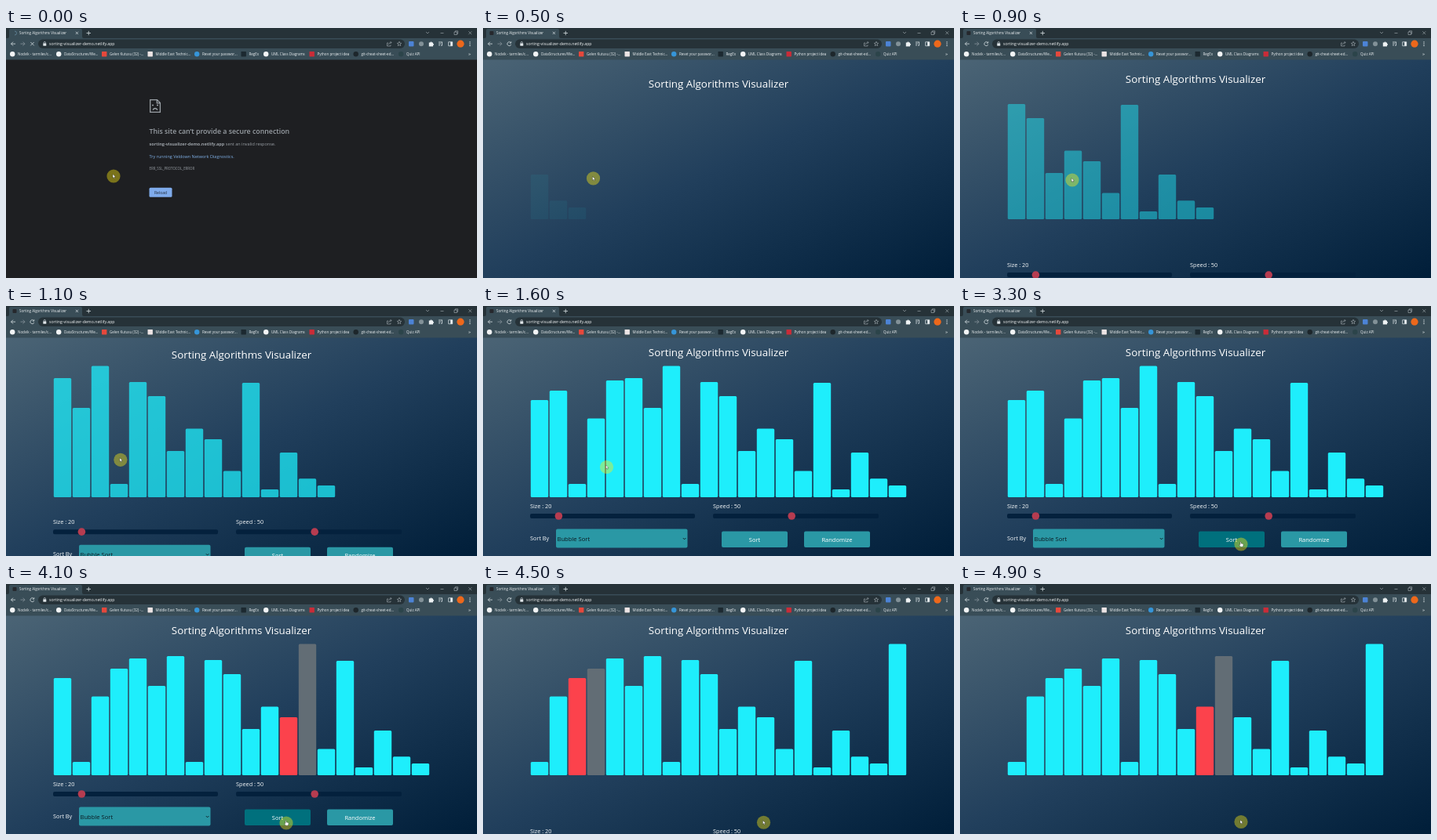
Write an HTML page that moves like this. It is 600 by 319 pixels and loops after 5 s.

```html
<!DOCTYPE html>
<html lang="en">
<head>
<meta charset="utf-8">
<title>Sorting Algorithms Visualizer</title>
<style>
  html, body { margin: 0; width: 100%; height: 100%; overflow: hidden; background: #263238; }
  svg { display: block; width: 100vw; height: 100vh; font-family: "Open Sans", "Noto Sans", sans-serif; }
  .line { fill: none; stroke: #d5dde1; stroke-width: .8; }
  .thin { fill: none; stroke: #b4bec3; stroke-width: .55; }
  .small { font-size: 4.5px; fill: #eef2f4; }
  .label { font-size: 7.3px; font-weight: 500; fill: #f6f9fa; }
  .button { font-size: 7.5px; font-weight: 500; fill: #fff; text-anchor: middle; }
</style>
</head>
<body>
<svg viewBox="0 0 600 319" preserveAspectRatio="none">
  <defs>
    <linearGradient id="night" x1="0" y1="0" x2="1" y2="1">
      <stop offset="0" stop-color="#4b6475"/>
      <stop offset=".5" stop-color="#213f5c"/>
      <stop offset="1" stop-color="#001e39"/>
    </linearGradient>
  </defs>

  <g id="errorPage">
    <rect y="40" width="600" height="279" fill="#1e1f22"/>
    <g fill="none" stroke="#9aa0a6" stroke-width="1.3">
      <path d="M183.7 91.6H192.5L196.4 95.5V107.4H183.7ZM192.3 91.6V95.8H196.4"/>
      <path d="M186 98.5H188M192 98.5H194M187 104.5Q190 100.5 193 104.5"/>
    </g>
    <g fill="#9aa0a6">
      <text x="182.5" y="135" font-size="8.8" font-weight="600">This site can’t provide a secure connection</text>
      <text x="182.5" y="150.3" font-size="5.5"><tspan font-weight="700">sorting-visualizer-demo.netlify.app</tspan> sent an invalid response.</text>
      <text x="182.5" y="165.5" font-size="5.5" fill="#7fb0e6">Try running Veldown Network Diagnostics.</text>
      <text x="182.5" y="181" font-size="4.4">ERR_SSL_PROTOCOL_ERROR</text>
    </g>
    <rect x="182.5" y="203.8" width="29" height="12" rx="1.5" fill="#7fabec"/>
    <text x="197" y="211.6" font-size="5" text-anchor="middle" fill="#202a3a">Reload</text>
  </g>

  <g id="appPage">
    <rect y="40" width="600" height="279" fill="url(#night)"/>
    <text id="title" x="300" y="64.3" font-size="13.35" font-weight="500" text-anchor="middle" fill="#fff">Sorting Algorithms Visualizer</text>
    <g id="bars"></g>
    <g id="controls">
      <text class="label" x="60" y="257.8">Size : 20</text>
      <text class="label" x="293" y="257.8">Speed : 50</text>
      <g fill="#04213d">
        <rect x="60" y="265" width="210" height="6" rx="2"/>
        <rect x="293" y="265" width="211" height="6" rx="2"/>
      </g>
      <g fill="#b63c50">
        <circle cx="96.4" cy="268" r="4.8"/>
        <circle cx="393.2" cy="268" r="4.8"/>
      </g>
      <text class="label" x="60" y="299.3">Sort By</text>
      <rect id="select" x="93" y="284.5" width="167.5" height="24" rx="2" stroke-width=".7"/>
      <text x="94.5" y="299.5" font-size="7.6" fill="#0b1820">Bubble Sort</text>
      <path d="M254.8 296L256.6 297.8L258.4 296" fill="none" stroke="#0b1820" stroke-width=".9"/>
      <rect id="sort" x="304" y="287.5" width="84" height="20.5" rx="2"/>
      <rect x="409" y="287.5" width="84" height="20.5" rx="2" fill="#2a98a5"/>
      <text class="button" x="346" y="300.6">Sort</text>
      <text class="button" x="451" y="300.6">Randomize</text>
    </g>
  </g>

  <g id="browser">
    <rect width="600" height="13" fill="#263238"/>
    <path d="M0 40.5V13H2Q4 13 4 11V3Q4 1 6 1H95Q97 1 97 3V11Q97 13 99 13H600V40.5Z" fill="#394d57"/>
    <text class="small" x="17" y="8.2">Sorting Algorithms Visualizer</text>
    <rect id="favicon" x="8.5" y="4" width="5" height="5" rx="1" fill="#26282d"/>
    <path id="spinner" class="line" d="M11 4A2.5 2.5 0 0 1 11 9" style="stroke:#65889c"/>
    <path class="line" d="M88.8 4.8L92 8M92 4.8L88.8 8M102.5 6.5H108M105.25 3.8V9.2"/>
    <path class="thin" d="M535 5L537 7L539 5M553.5 6.5H557.5M589.3 4.3L593.2 8.2M593.2 4.3L589.3 8.2M571 5H574.5V8.5H571ZM572.3 5V3.8H575.7V7.3H574.5"/>
    <rect x="41" y="14.5" width="467" height="11.5" rx="5.7" fill="#263238"/>
    <path class="line" d="M12 20.2H6.5M9 17.7L6.5 20.2L9 22.7"/>
    <path class="line" d="M18.5 20.2H24M21.5 17.7L24 20.2L21.5 22.7" style="stroke:#87949b"/>
    <path id="stop" class="line" d="M31.3 18L35.7 22.4M35.7 18L31.3 22.4"/>
    <path id="reload" class="line" d="M35.2 18.5A2.5 2.5 0 1 0 35.8 21M35.8 17.3V19.2H33.9"/>
    <rect x="47.3" y="19.5" width="4" height="3.3" rx=".5" fill="#dfe5e8"/>
    <path class="line" d="M48.2 20V18.6A1.1 1.1 0 0 1 50.4 18.6V20" style="stroke-width:.7"/>
    <text x="55" y="22.1" font-size="5.2" fill="#f6f8f9">sorting-visualizer-demo.netlify.app</text>
    <path class="thin" d="M487 19H485.5V23H490V21.5M487 21.5Q487.5 18.5 491 18.5M489.5 17L491 18.5L489.5 20M501 17.3L501.8 19.2L503.7 19.4L502.2 20.7L502.7 22.7L501 21.6L499.3 22.7L499.8 20.7L498.3 19.4L500.2 19.2Z"/>
    <rect x="513" y="17" width="6.5" height="6.5" rx="1" fill="#4c83d6"/>
    <circle cx="529" cy="20.2" r="3" fill="#829198"/>
    <path d="M538.8 18.5H540.5A1 1 0 0 1 542.5 18.5H544V20A1 1 0 0 1 544 22V23.5H538.8Z" fill="#eef2f4"/>
    <path class="line" d="M551 18H556M551 20H554M551 22H553M555.5 18V22.3H554"/>
    <path class="line" d="M563.7 17.8H568.7V22.8H563.7Z"/>
    <rect x="566.2" y="17.8" width="2.5" height="5" fill="#eef2f4"/>
    <circle cx="579" cy="20.2" r="4.6" fill="#ed681b"/>
    <g fill="#eef2f4"><circle cx="591" cy="17.9" r=".65"/><circle cx="591" cy="20.2" r=".65"/><circle cx="591" cy="22.5" r=".65"/></g>
    <text class="small" x="589" y="34.6" style="font-size:6px">»</text>
  </g>

  <g id="cursor">
    <circle r="8.6" fill="#ffeb10" fill-opacity=".41"/>
    <path id="arrow" d="M-1 -2.5V2.3L.1 1.3L.9 3L1.7 2.6L1 1H2.5Z" fill="#fff" stroke="#222" stroke-width=".35"/>
    <path id="hand" d="M-1 -3Q-.4 -3.6 .1 -3V-1L2.7 -.5Q3.2 0 2.8 2L2.2 3.2H-.7L-2.5 .5Q-2.3 -.2 -1 .5Z" fill="#fff" stroke="#222" stroke-width=".35"/>
  </g>
</svg>
<script>
const LOOP = 5000, FRAME = 100, LOADED = 350, SORTING = 3512, STEP = 47;
const HEIGHTS = [124, 136, 17, 100.5, 149, 152, 114, 167.5, 17, 147, 129, 59, 87.5, 74, 33.5, 146, 10, 57, 23.7, 15];
const PATH = [[0, 137, 189], [900, 143, 194], [1600, 157.5, 205.5], [2600, 144.5, 295],
              [3300, 358, 304], [4100, 357, 305], [4900, 358, 303.5], [5000, 358, 303.5]];
const BOOKMARKS = [
  [5, "Nodvik - tarmiles/c...", "#f2f4f5", 1], [64, "DataStructures/We...", "#f2f4f5", 1],
  [122, "Gelen Kutusu (32) -...", "#e5483c"], [180.5, "Middle East Technic...", "#ece4e4"],
  [240, "Reset your passwor...", "#3695d8", 1], [299.5, "RegEx", "#1c2930"],
  [328, "UML Class Diagrams", "#f2f4f5", 1], [386.5, "Python project idea", "#c92c38"],
  [442.5, "git-cheat-sheet-ed...", "#1d262b", 1], [500, "Quiz API", "#2c444a", 1]];

const $ = id => document.getElementById(id);
const clamp = v => Math.max(0, Math.min(1, v));
const show = (id, on) => $(id).setAttribute("visibility", on ? "visible" : "hidden");
const move = (id, x, y) => $(id).setAttribute("transform", `translate(${x} ${y})`);

function add(parent, tag, attrs, text = "") {
  const el = document.createElementNS("http://www.w3.org/2000/svg", tag);
  for (const key in attrs) el.setAttribute(key, attrs[key]);
  el.textContent = text;
  return parent.appendChild(el);
}

for (const [x, name, fill, round] of BOOKMARKS) {
  add($("browser"), "rect", { x, y: 30, width: 6.4, height: 6.4, rx: round ? 3.2 : 0.6, fill });
  add($("browser"), "text", { x: x + 10, y: 34.7, class: "small" }, name);
}
const bars = HEIGHTS.map((_, i) =>
  add($("bars"), "rect", { x: 60.8 + 24 * i, width: 22.4, rx: 1.6 }));

// Bubble sort after the given number of comparisons.
function sortState(steps) {
  const list = [...HEIGHTS];
  let j = -1, end = list.length - 1;
  for (let n = 0; n <= steps; n++) {
    if (++j >= end) { j = 0; end--; }
    if (list[j] > list[j + 1]) [list[j], list[j + 1]] = [list[j + 1], list[j]];
  }
  return { list, j };
}

function cursorAt(t) {
  const i = PATH.findIndex(p => p[0] > t);
  const [t0, x0, y0] = PATH[i - 1], [t1, x1, y1] = PATH[i];
  const p = (t - t0) / (t1 - t0), e = p * p * (3 - 2 * p);
  return [x0 + (x1 - x0) * e, y0 + (y1 - y0) * e];
}

function drawBars(t) {
  const count = Math.max(0, Math.min(20, Math.floor((t - 325) / 50)));
  const { list, j } = t < SORTING ? { list: HEIGHTS.slice(20 - count), j: -9 }
                                  : sortState(Math.floor((t - SORTING) / STEP));
  bars.forEach((bar, i) => {
    const h = list[i] || 0;
    bar.setAttribute("y", 244 - h);
    bar.setAttribute("height", h);
    bar.setAttribute("fill", i === j ? "#fc424c" : i === j + 1 ? "#626d75" : "#1eeefc");
  });
}

function draw(now) {
  const t = Math.floor(now % LOOP / FRAME) * FRAME;
  const loaded = t >= LOADED, entry = clamp((t - LOADED) / 900);
  show("errorPage", !loaded);
  show("appPage", loaded);
  for (const id of ["spinner", "stop"]) show(id, !loaded);
  for (const id of ["favicon", "reload"]) show(id, loaded);
  $("spinner").setAttribute("transform", `rotate(${t * 0.45} 11 6.5)`);

  drawBars(t);
  $("bars").setAttribute("opacity", entry ** 1.6);
  const drop = 121 * (1 - entry + clamp((t - 4250) / 500));
  move("controls", 0, drop);
  move("title", 0, 14 * (1 - entry));

  const [x, y] = cursorAt(t);
  const over = (left, right, top) => x > left && x < right && y > top + drop && y < 308 + drop;
  const onSelect = over(93, 260, 284.5), onSort = over(304, 388, 287.5);
  $("select").setAttribute("fill", onSelect ? "#06808d" : "#2a98a5");
  $("select").setAttribute("stroke", onSelect ? "#7d8d91" : "none");
  $("sort").setAttribute("fill", onSort ? "#00707d" : "#2a98a5");
  move("cursor", x, y);
  show("hand", onSelect || onSort);
  show("arrow", !onSelect && !onSort);
}

const start = performance.now();
function tick() {
  draw(performance.now() - start);
  requestAnimationFrame(tick);
}
tick();
</script>
</body>
</html>
```
